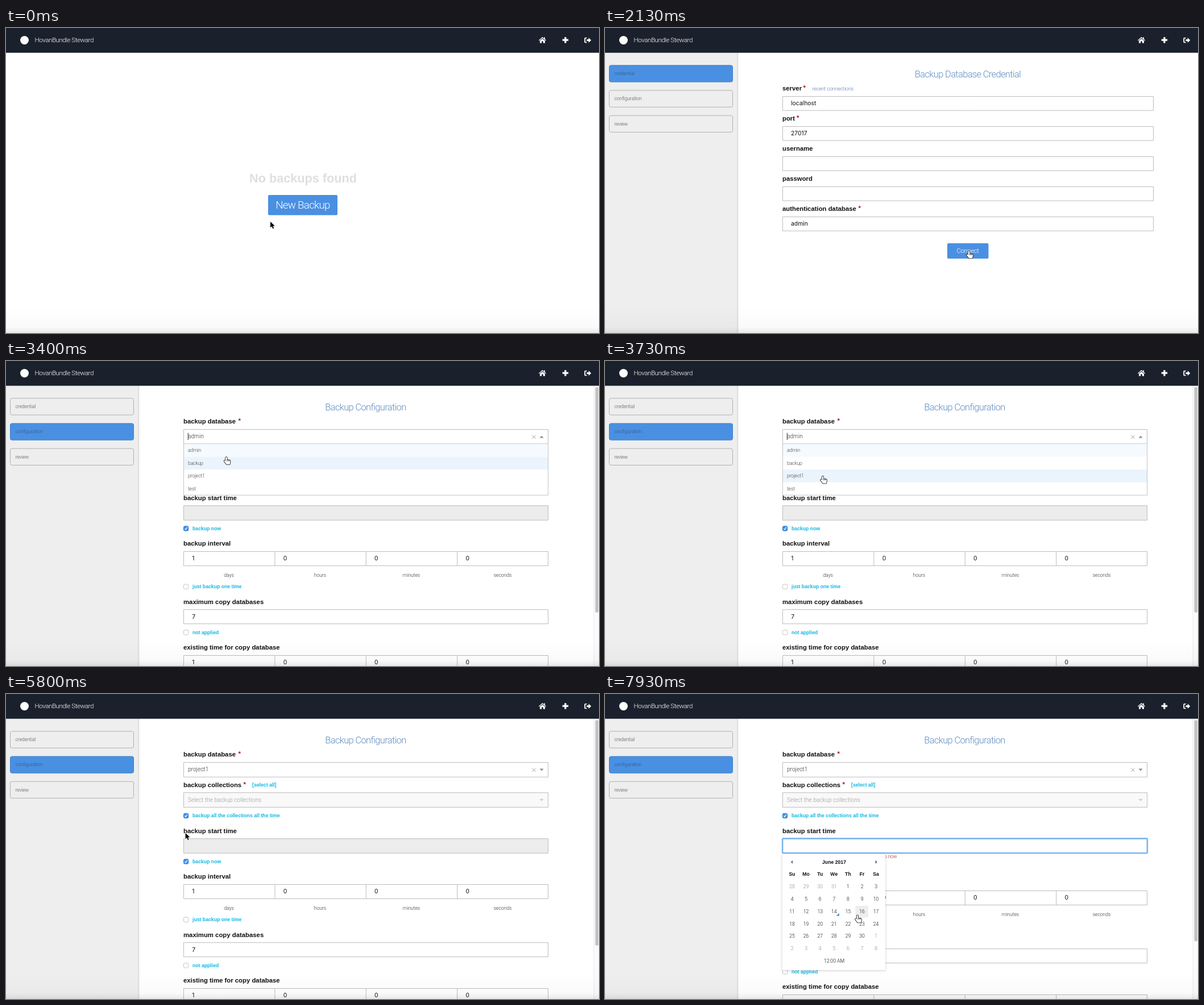
An HTML page with a canvas for the animation above (8 s loop, 1043 by 537 pixels).

```html
<!DOCTYPE html>
<html lang="en">
<head>
<meta charset="utf-8">
<title>Backup setup</title>
<style>
html, body { margin: 0; width: 100%; height: 100%; overflow: hidden; background: #fff; }
canvas { display: block; }
</style>
</head>
<body>
<canvas id="stage" width="1043" height="537"></canvas>
<script>
const c = document.getElementById('stage').getContext('2d');
const LOOP = 8000, FPS = 15;
const BLUE = '#4a90e2', LINE = '#bcbcbc', CYAN = '#0fb8e4', HEADING = '#5f8cc2';
const LIGHT = 'Roboto, "Liberation Sans", sans-serif';
const BOLD = '"Liberation Sans", Arial, sans-serif';
const FIELD = 'Inter, "Liberation Sans", sans-serif';

// Moments (ms) at which the state changes
const AT = { form: 800, config: 2270, open: 3130, pick: 4000, all: 5270, later: 6400, calendar: 7330 };

// Pointer path: time, x, y
const PATH = [
  [0, 465, 341], [270, 465, 341], [730, 523, 320], [1130, 523, 320],
  [1800, 640, 393], [2200, 640, 393], [2800, 404, 150], [3000, 392, 136],
  [3200, 392, 136], [3600, 383, 203], [4070, 383, 203], [4930, 326, 215],
  [5150, 316, 213], [5470, 316, 213], [6230, 315, 292], [6670, 315, 292],
  [7200, 430, 268], [7400, 430, 268], [7930, 444, 390], [8000, 444, 390]
];

const ICONS = {
  home: new Path2D('M6.5 .3L13 6l-.8 .9L6.5 2 .8 6.9 0 6zM2 7L6.5 3.2 11 7v4H7.8V7.8H5.2V11H2zM9.4 .8h1.6v3.3L9.4 2.7z'),
  plus: new Path2D('M3.6 0h3.2v3.6h3.6v3.2H6.8v3.6H3.6V6.8H0V3.6h3.6z'),
  exit: new Path2D('M4.2 .8H1.6Q0 .8 0 2.4v6.2q0 1.6 1.6 1.6h2.6V8.6H1.8V2.4h2.4zM4 3.9h3.4V1L12 5.5 7.4 10V7.1H4z'),
};
const POINTERS = {
  arrow: new Path2D('M0 0v10.6l2.5-2.3 1.7 3.9 1.9-.8-1.7-3.8h3.4z'),
  hand: new Path2D('M-1.3 6.2V.9a1.3 1.3 0 0 1 2.6 0v3.3l4.4 .9q1.5 .4 1.4 2L6.2 12.4H.4L-3.8 7.3q-.5-1.6 .9-1.7z'),
  text: new Path2D('M-2-5.5q2 0 2 1.5v8q0 1.5-2 1.5M2-5.5Q0-5.5 0-4M2 5.5Q0 5.5 0 4')
};

function text(s, x, y, size, color, { font = LIGHT, weight = 300, gap = 0, align = 'left' } = {}) {
  c.font = `${weight} ${size}px ${font}`;
  c.letterSpacing = gap * size + 'px';
  c.textAlign = align;
  c.textBaseline = 'middle';
  c.fillStyle = color;
  c.fillText(s, x, y);
}

const bold = (s, x, y, size, color, align) =>
  text(s, x, y, size, color, { font: BOLD, weight: 700, align });
const label = (s, y) => bold(s, 312, y, 11.35, '#111');
const star = (x, y) => bold('*', x, y, 11.5, '#a81414');
const value = (s, x, y) => text(s, x, y, 10.4, '#111', { font: FIELD, weight: 400 });
const centered = (s, x, y, size, color, gap = -.04) =>
  text(s, x, y, size, color, { gap, align: 'center' });

function rect(x, y, w, h, fill) {
  c.fillStyle = fill;
  c.fillRect(x, y, w, h);
}

function box(x, y, w, h, fill, border, radius = 0, width = 1) {
  c.beginPath();
  c.roundRect(x, y, w, h, radius);
  if (fill) { c.fillStyle = fill; c.fill(); }
  if (border) { c.strokeStyle = border; c.lineWidth = width; c.stroke(); }
}

function poly(points, fill) {
  c.beginPath();
  points.forEach(p => c.lineTo(...p));
  c.fillStyle = fill;
  c.fill();
}

function line(points, color, width = 1) {
  c.beginPath();
  points.forEach(p => c.lineTo(...p));
  c.strokeStyle = color;
  c.lineWidth = width;
  c.stroke();
}

function icon(path, x, y) {
  c.save();
  c.translate(x, y);
  c.fillStyle = '#fff';
  c.fill(path);
  c.restore();
}

function header() {
  rect(0, 0, 1043, 43.6, '#1a212c');
  c.beginPath();
  c.arc(32.5, 21.5, 7.5, 0, 7);
  c.fillStyle = '#fff';
  c.fill();
  text('HovanBundle Steward', 50.5, 21.8, 11.6, '#fff', { gap: -.04 });
  icon(ICONS.home, 937, 15.5);
  icon(ICONS.plus, 978.7, 16);
  icon(ICONS.exit, 1017.3, 16);
}

function sidebar(active) {
  rect(0, 43, 233, 494, '#eee');
  rect(232.5, 43, 1.2, 494, '#cfcfcf');
  rect(233.7, 43, 1.3, 494, '#f1f1f1');
  ['credential', 'configuration', 'review'].forEach((name, i) => {
    const y = 65.7 + 44.2 * i, on = i === active;
    box(7.5, y, 217, 29.3, on ? BLUE : null, on ? '#4380c8' : '#b0b0b0', 3);
    text(name, 16.5, y + 15, 8.7, on ? '#34557d' : '#555', { gap: -.02 });
  });
}

function home() {
  bold('No backups found', 522.5, 266, 21.67, '#dfdfdf', 'center');
  box(461, 294, 122, 35.5, BLUE, null, 2);
  centered('New Backup', 522, 312.5, 18.8, '#fff');
}

function credentials() {
  sidebar(0);
  centered('Backup Database Credential', 638, 82.5, 16.5, HEADING);
  const fields = [['server', 'localhost', 348.5], ['port', '27017', 337], ['username', ''],
    ['password', ''], ['authentication database', 'admin', 445.5]];
  fields.forEach(([name, content, starX], i) => {
    const y = 106 + 53 * i;
    label(name, y + .5);
    if (starX) star(starX, y);
    box(312.5, y + 14.5, 652, 24.7, '#fff', LINE);
    value(content, 327, y + 27);
  });
  text('recent connections', 364.5, 107, 8.7, '#4f74a8');
  box(602, 379, 72.5, 27, BLUE, null, 2);
  centered('Connect', 638, 392.7, 11.5, '#fff');
}

function checkbox(name, y, on) {
  box(312.5, y - 4.2, 8.3, 8.3, on ? '#3c8ee9' : '#fff', on ? '#3584dc' : '#c4c4c4', 2);
  if (on) line([[314.4, y], [316, y + 2], [318.9, y - 2.4]], '#fff', 1.2);
  bold(name, 328, y + .3, 8.7, CYAN);
}

function cells(y, values) {
  box(312.5, y, 641, 25, '#fff', LINE);
  values.forEach((v, i) => {
    const x = 312.5 + 160.4 * i;
    if (i) line([[x, y], [x, y + 25]], LINE);
    value(v, x + 14.8, y + 12.8);
  });
}

function select(y, s, color, { off, clear, up, focus } = {}) {
  if (focus) box(312.5, y, 641, 25.7, null, 'rgba(0,126,255,.1)', 0, 4);
  box(312.5, y, 641, 25.7, off ? '#f9f9f9' : '#fff', focus ? '#b4c6d4' : LINE);
  text(s, 320, y + 13, 10.14, color);
  const m = y + 13, d = up ? -2 : 2;
  poly([[938.5, m - d], [945.5, m - d], [942, m + d]], off ? '#ccc' : '#8f8f8f');
  if (clear) {
    line([[925.5, m - 2.7], [931.5, m + 3.3]], '#999');
    line([[931.5, m - 2.7], [925.5, m + 3.3]], '#999');
  }
}

function options(p) {
  box(312.5, 145.7, 641, 90.5, '#fff', '#c4c4c4');
  ['admin', 'backup', 'project1', 'test'].forEach((name, i) => {
    const y = 146.2 + 22.5 * i;
    const hover = p.y >= y && p.y < y + 22.5;
    if (hover || !i) rect(313, y, 640, 22.3, hover ? '#ebf4fc' : '#f5faff');
    text(name, 320, y + 11.4, 8.7, '#444', { gap: -.02 });
  });
  line([[320.3, 126.5], [320.3, 139]], '#333');
}

function calendar(p) {
  c.save();
  c.shadowColor = 'rgba(0,0,0,.2)';
  c.shadowBlur = 4;
  c.shadowOffsetY = 1;
  rect(312, 281.5, 181, 204.5, '#fff');
  c.restore();
  bold('‹', 329, 296, 11, '#111', 'center');
  bold('June 2017', 403, 296.3, 8.7, '#111', 'center');
  bold('›', 476.5, 296, 11, '#111', 'center');
  const colX = i => 329 + 24.6 * i;
  ['Su', 'Mo', 'Tu', 'We', 'Th', 'Fr', 'Sa'].forEach((d, i) => bold(d, colX(i), 318, 8.7, '#111', 'center'));
  for (let i = 0; i < 42; i++) {
    const n = i - 3, x = colX(i % 7), y = 339.7 + 21.75 * Math.floor(i / 7);
    const inside = n > 0 && n < 31;
    if (Math.abs(p.x + 2 - x) < 12 && Math.abs(p.y - y) < 10.8) rect(x - 11.5, y - 10.3, 22.5, 20.5, '#eee');
    centered(n < 1 ? n + 31 : inside ? n : n - 30, x, y, 8.7, inside ? '#111' : '#888', -.01);
    if (n === 14) poly([[x + 9, y + 2.5], [x + 9, y + 7.5], [x + 4, y + 7.5]], '#3b8fc4');
  }
  centered('12:00 AM', 403, 470.3, 8.9, '#111', -.01);
}

function configuration(t, p) {
  const open = t >= AT.open && t < AT.pick;
  const all = t >= AT.all, later = t >= AT.later, cal = t >= AT.calendar;
  const dy = later ? 11 : 0;
  sidebar(1);
  centered('Backup Configuration', 632.5, 82.5, 16.5, HEADING);

  label('backup database', 106.5);
  star(408.5, 106);
  label('backup collections', 160.5);
  star(417.5, 160);
  bold('[select all]', 433, 161, 8.7, CYAN);
  select(173.7, 'Select the backup collections', '#999', { off: all });
  checkbox('backup all the collections all the time', 214.4, all);
  select(120.5, t < AT.pick ? 'admin' : 'project1', '#333',
    { clear: true, up: open, focus: t >= AT.pick && !all });

  label('backup start time', 241.5);
  box(312.5, 254.7, 641, 25.5, later ? '#fff' : '#ececec', LINE);
  if (later) text('please specify backup startTime or select backup now', 312, 286.3, 8.7, '#ab201c', { gap: -.01 });
  checkbox('backup now', 295 + dy, !later);

  label('backup interval', 322.3 + dy);
  cells(335.5 + dy, [1, 0, 0, 0]);
  ['days', 'hours', 'minutes', 'seconds'].forEach((s, i) =>
    centered(s, 392 + 160.5 * i, 377.5 + dy, 8.7, '#333', -.01));
  checkbox('just backup one time', 397.3 + dy, false);

  label('maximum copy databases', 424.7 + dy);
  cells(437.7 + dy, [7]);
  checkbox('not applied', 478 + dy, false);
  label('existing time for copy database', 505.3 + dy);
  cells(518.5 + dy, [1, 0, 0, 0]);

  rect(1033.5, 43, 9.5, 494, '#fafafa');
  rect(1033.5, 43, 1, 494, '#e9e9e9');
  box(1036.5, 46, 5.5, later ? 389.5 : 397, '#c2c2c2', null, 2.7);

  if (open) options(p);
  if (cal) {
    box(312.2, 254.5, 641.6, 25.6, '#fff', 'rgba(90,165,240,.3)', 1, 3.4);
    box(312.2, 254.5, 641.6, 25.6, null, '#6dadec', 1, 1.8);
    calendar(p);
  }
}

function bottomShade() {
  const g = c.createLinearGradient(0, 490, 0, 537);
  g.addColorStop(0, 'rgba(0,0,0,0)');
  g.addColorStop(.78, 'rgba(0,0,0,.018)');
  g.addColorStop(1, 'rgba(0,0,0,.09)');
  rect(0, 490, 1043, 47, g);
}

function pointerAt(t) {
  const i = PATH.findIndex(k => k[0] > t);
  const [t0, x0, y0] = PATH[i - 1], [t1, x1, y1] = PATH[i];
  const u = (t - t0) / (t1 - t0), e = u * u * (3 - 2 * u);
  return { x: x0 + (x1 - x0) * e, y: y0 + (y1 - y0) * e };
}

function pointerKind(t, { x, y }) {
  const over = (l, top, r, b) => x > l && x < r && y > top && y < b;
  if (t < AT.form) return over(461, 294, 583, 330) ? 'hand' : 'arrow';
  if (t < AT.config) return over(602, 379, 675, 406) ? 'hand' : over(312, 332, 965, 357) ? 'text' : 'arrow';
  if (t >= AT.open && t < AT.pick && over(312, 146, 954, 236)) return 'hand';
  if (t >= AT.calendar && over(312, 282, 493, 486)) return 'hand';
  return t >= AT.later && over(312, 254, 954, 281) ? 'text' : 'arrow';
}

function pointer(kind, p) {
  const shape = POINTERS[kind];
  c.save();
  c.translate(p.x, p.y);
  c.lineJoin = 'round';
  c.lineWidth = kind === 'text' ? 1 : 1.6;
  c.strokeStyle = kind === 'arrow' ? '#fff' : '#111';
  c.stroke(shape);
  if (kind !== 'text') {
    c.fillStyle = kind === 'arrow' ? '#000' : '#fff';
    c.fill(shape);
  }
  if (kind === 'hand') {
    for (const x of [1.2, 3.2, 5.2]) line([[x, 4.6], [x, 7]], '#111', .8);
  }
  c.restore();
}

function draw(t) {
  const p = pointerAt(t);
  rect(0, 0, 1043, 537, '#fff');
  if (t < AT.form) home();
  else if (t < AT.config) credentials();
  else configuration(t, p);
  header();
  bottomShade();
  pointer(pointerKind(t, p), p);
}

const start = performance.now();
function tick() {
  const t = (performance.now() - start) % LOOP;
  draw(Math.min(Math.floor((t + 4) * FPS / 1000) * 1000 / FPS, LOOP - 1));
  requestAnimationFrame(tick);
}
tick();
</script>
</body>
</html>
```
